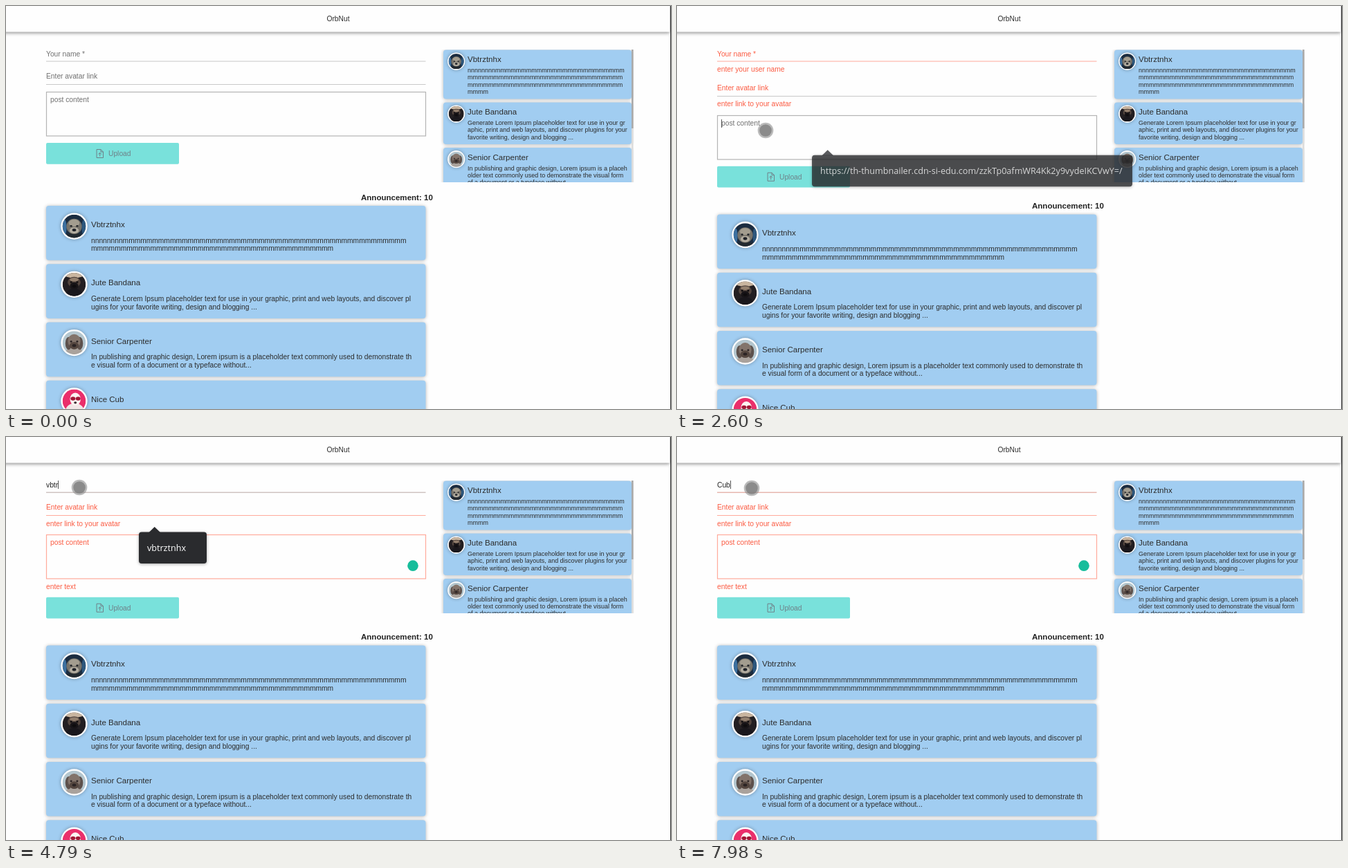
Recreate the animation shown at these times as an HTML page with a canvas. Size 961 by 583 pixels, loop 8000 ms.

```html
<!DOCTYPE html>
<html lang="en">
<head>
<meta charset="utf-8">
<title>Post board</title>
<style>
html, body { margin: 0; width: 100%; height: 100%; overflow: hidden; background: #fefefe; }
canvas { display: block; }
</style>
</head>
<body>
<canvas id="stage" width="961" height="583"></canvas>
<script>
const ctx = document.getElementById('stage').getContext('2d');
const LOOP = 8000, TICK = 1000 / 15, ERROR_HEIGHT = 16.85;
const SANS = '"Liberation Sans", Arial, sans-serif';
const POPUP_FONT = '"Open Sans", "Noto Sans", sans-serif';
const LABEL = '#707070', RED = '#fb5a41', INK = '#2c2c2c';
const LINE_GREY = [200, 200, 200], BOX_GREY = [180, 180, 180], LINE_RED = [255, 170, 155];
const USER = 'vbtrztnhx';
const LINK = 'https://th-thumbnailer.cdn-si-edu.com/zzkTp0afmWR4Kk2y9vydeIKCVwY=/';
const ms = n => 'm'.repeat(n);

const posts = [
  { name: 'Vbtrztnhx', face: shaggyDog,
    wide: ['n'.repeat(8) + ms(48), ms(41)],
    narrow: ['n'.repeat(8) + ms(25), ms(30), ms(30), ms(4)] },
  { name: 'Jute Bandana', face: pug,
    wide: ['Generate Lorem Ipsum placeholder text for use in your graphic, print and web layouts, and discover pl',
      'ugins for your favorite writing, design and blogging ...'],
    narrow: ['Generate Lorem Ipsum placeholder text for use in your gr',
      'aphic, print and web layouts, and discover plugins for your',
      'favorite writing, design and blogging ...'] },
  { name: 'Senior Carpenter', face: greyDog,
    wide: ['In publishing and graphic design, Lorem ipsum is a placeholder text commonly used to demonstrate th',
      'e visual form of a document or a typeface without...'],
    narrow: ['In publishing and graphic design, Lorem ipsum is a placeh',
      'older text commonly used to demonstrate the visual form',
      'of a document or a typeface without...'] },
  { name: 'Nice Cub', face: partyDog, wide: [], narrow: [] }
];

// [time, text in the name field]
const typing = [[0, ''], [4200, USER.slice(0, 1)], [4400, USER.slice(0, 2)], [4530, USER.slice(0, 3)],
  [4660, USER.slice(0, 4)], [5920, USER.slice(0, 3)], [6120, USER.slice(0, 2)], [6250, USER.slice(0, 1)],
  [6380, ''], [7310, 'C'], [7520, 'Cu'], [7850, 'Cub']];

// [time, x, y]
const pointerPath = [[460, 788, 541], [860, 240, 110], [1000, 148, 55], [1070, 143, 61], [1260, 143, 61],
  [1460, 112, 71], [1730, 110, 72], [2000, 123, 113], [2200, 123, 113], [2530, 128, 179], [2600, 128, 180],
  [2870, 118, 28], [3130, 103, 79], [3470, 103, 79], [3930, 106, 73], [5260, 106, 73], [5395, 97, 75],
  [5520, 106, 75], [6120, 106, 75], [6510, 109, 75], [7060, 109, 75], [7120, 108, 74]];
const presses = [[1460, 1590], [2060, 2130], [2470, 2590], [3080, 3270]];

const between = (t, a, b) => t >= a && t < b;
const ramp = (t, start, span = 300) => Math.min(1, Math.max(0, (t - start) / span));
const mix = (a, b, k) => `rgb(${a.map((v, i) => Math.round(v + (b[i] - v) * k))})`;

function text(str, x, y, size = 10.25, color = INK, { weight = '', family = SANS, align = 'left' } = {}) {
  ctx.font = `${weight} ${size}px ${family}`;
  ctx.fillStyle = color;
  ctx.textAlign = align;
  ctx.fillText(str, x, y);
}

function rect(x, y, w, h, color) {
  ctx.fillStyle = color;
  ctx.fillRect(x, y, w, h);
}

function roundRect(x, y, w, h, r, color) {
  ctx.fillStyle = color;
  ctx.beginPath();
  ctx.roundRect(x, y, w, h, r);
  ctx.fill();
}

function oval(x, y, rx, ry, color) {
  ctx.fillStyle = color;
  ctx.beginPath();
  ctx.ellipse(x, y, rx, ry, 0, 0, 7);
  ctx.fill();
}

function withShadow(blur, alpha, offset, draw) {
  ctx.save();
  ctx.shadowColor = `rgba(0,0,0,${alpha})`;
  ctx.shadowBlur = blur;
  ctx.shadowOffsetY = offset;
  draw();
  ctx.restore();
}

// Portraits are painted in a unit circle.
function eyesAndNose(color, y) {
  oval(-0.26, y, 0.09, 0.08, color);
  oval(0.26, y, 0.09, 0.08, color);
  oval(0, y + 0.34, 0.17, 0.12, color);
}
function shaggyDog() {
  rect(-1, -1, 2, 2, '#1b2c40');
  oval(-0.85, 0.1, 0.2, 0.7, '#3d709f');
  oval(0.85, 0.1, 0.2, 0.7, '#2d577d');
  oval(0, 0.95, 0.7, 0.4, '#22292f');
  oval(0, 0.02, 0.66, 0.66, '#77736a');
  oval(0, -0.28, 0.46, 0.3, '#a39d8f');
  oval(0, 0.36, 0.4, 0.26, '#b3ada0');
  eyesAndNose('#1d2026', -0.02);
}
function pug() {
  rect(-1, -1, 2, 2, '#231f22');
  oval(0, -0.9, 0.9, 0.34, '#c9b59f');
  oval(0, -0.2, 0.56, 0.46, '#54463f');
  oval(0, -0.42, 0.38, 0.16, '#94806e');
  oval(0, 0.12, 0.36, 0.3, '#171417');
  oval(0, 0.85, 0.7, 0.5, '#19171c');
  eyesAndNose('#0e0c0e', -0.2);
}
function greyDog() {
  rect(-1, -1, 2, 2, '#b4c6ce');
  oval(0, 0.9, 0.75, 0.5, '#aaa29c');
  oval(-0.48, 0.05, 0.28, 0.55, '#5d514c');
  oval(0.48, 0.05, 0.28, 0.55, '#5d514c');
  oval(0, -0.14, 0.54, 0.6, '#83746b');
  oval(0, 0.25, 0.4, 0.32, '#54463f');
  eyesAndNose('#2a2324', -0.1);
}
function partyDog() {
  rect(-1, -1, 2, 2, '#ea2f6b');
  oval(0.05, 0.85, 0.8, 0.65, '#f1e6e6');
  oval(0.1, -0.15, 0.46, 0.55, '#fbf3f1');
  oval(-0.1, -0.2, 0.21, 0.16, '#a31836');
  oval(0.34, -0.2, 0.21, 0.16, '#a31836');
  oval(0.1, 0.15, 0.12, 0.09, '#3b2a30');
}

function avatar(x, y, r, border, face) {
  withShadow(5, 0.3, 0, () => oval(x, y, r, r, '#fff'));
  ctx.save();
  ctx.beginPath();
  ctx.arc(x, y, r - border, 0, 7);
  ctx.clip();
  ctx.translate(x, y);
  ctx.scale(r - border, r - border);
  face();
  ctx.restore();
}

function card(x, y, w, h) {
  withShadow(5, 0.3, 0.5, () => roundRect(x, y, w, h, 4, '#a1cdf1'));
}

function header() {
  withShadow(5, 0.45, 1, () => rect(-10, -10, 969, 47.5, '#fefefe'));
  text('OrbNut', 480, 22, 10.25, INK, { align: 'center' });
  rect(960, 0, 1, 583, '#2a2a2a');
}

function sidebar() {
  ctx.save();
  ctx.beginPath();
  ctx.rect(628, 63, 280, 192);
  ctx.clip();
  let top = 63.5;
  for (const post of posts.slice(0, 3)) {
    const height = 29.2 + post.narrow.length * 10.45;
    card(632, top, 272, height);
    avatar(650.7, top + 16.6, 12.6, 1.6, post.face);
    text(post.name, 667, top + 17.7, 11.54);
    post.narrow.forEach((line, i) => text(line, 667, top + 32.5 + i * 10.45, 8.97));
    top += height + 5;
  }
  rect(904, 63, 2.5, 192, '#dcdcdc');
  rect(904, 63, 2.5, 114, '#a9a9a9');
  ctx.restore();
}

function postList(shift) {
  text('Announcement: 10', 513, 281 + shift, 11.54, '#222', { weight: 'bold' });
  posts.forEach((post, i) => {
    const top = 289 + shift + i * 84.25;
    card(58, top, 548.5, 78.7);
    avatar(98.5, top + 29.6, 19.2, 2.4, post.face);
    text(post.name, 123, top + 31, 11.54);
    post.wide.forEach((line, n) => text(line, 123, top + 53.7 + n * 11.6));
  });
}

function uploadButton(top) {
  roundRect(58, top, 192, 30.7, 2, '#79e1db');
  text('Upload', 148, top + 18.8, 10.25, '#6f8088');
  ctx.strokeStyle = '#6f8088';
  ctx.lineWidth = 1;
  ctx.beginPath();
  ctx.moveTo(137, top + 9.5);
  ctx.lineTo(131, top + 9.5);
  ctx.lineTo(131, top + 21.5);
  ctx.lineTo(140.5, top + 21.5);
  ctx.lineTo(140.5, top + 13);
  ctx.lineTo(137, top + 9.5);
  ctx.lineTo(137, top + 13);
  ctx.lineTo(140.5, top + 13);
  ctx.moveTo(135.7, top + 19.5);
  ctx.lineTo(135.7, top + 14.5);
  ctx.moveTo(133.5, top + 16.5);
  ctx.lineTo(135.7, top + 14.2);
  ctx.lineTo(138, top + 16.5);
  ctx.stroke();
}

function caret(x, y) {
  rect(Math.round(x), Math.round(y), 1, 12, '#555');
}

function form(t) {
  const name = typing.findLast(([start]) => t >= start)[1];
  const nameError = t >= 2060 && name.length < 3;
  const linkError = t >= 2600;
  const postError = t >= 3200;
  const nameFocus = t >= 3080;
  const linkTop = nameError ? ERROR_HEIGHT : 0;
  const postTop = 124 + linkTop + (linkError ? ERROR_HEIGHT : 0);
  const errors = nameError + linkError + postError;

  const nameRed = ramp(t, 2060) - ramp(t, 4530) + ramp(t, 6120) - ramp(t, 7850);
  if (name) text(name, 58, 72.6, 10.25, '#222');
  else text('Your name *', 58, 72.6, 10.25, nameError ? RED : LABEL);
  if (nameFocus && t >= 3400 && !between(t, 6850, 7310)) {
    ctx.font = `10.25px ${SANS}`;
    caret(58 + ctx.measureText(name).width, 63);
  }
  rect(58, 79.5, 548.5, nameFocus ? 1.5 : 1, mix(LINE_GREY, LINE_RED, nameRed));
  if (nameError) text(name ? 'name is too short' : 'enter your user name', 58, 95.2, 10.25, RED);

  text('Enter avatar link', 58, 104.8 + linkTop, 10.25, linkError ? RED : LABEL);
  if (between(t, 2130, 2530)) caret(58, 95 + linkTop);
  rect(58, Math.round(113 + linkTop), 548.5, 1, mix(LINE_GREY, LINE_RED, ramp(t, 2600)));
  if (linkError) text('enter link to your avatar', 58, 128.6 + linkTop, 10.25, RED);

  ctx.strokeStyle = mix(BOX_GREY, LINE_RED, ramp(t, 3140));
  ctx.lineWidth = 1.2;
  ctx.strokeRect(58.5, Math.round(postTop) + 0.5, 548, 63.5);
  text('post content', 64, postTop + 15.2, 10.25, postError ? RED : LABEL);
  if (between(t, 2590, 3080)) caret(64, postTop + 6);
  if (postError) text('enter text', 58, postTop + 79, 10.25, RED);
  if (t >= 3600) oval(588, postTop + 45.3, 7.8, 7.8, '#17bd9b');

  uploadButton(198 + errors * ERROR_HEIGHT);
  postList(Math.max(0, errors * ERROR_HEIGHT - 21.3));
}

// While opening, a popup is slightly smaller and casts no shadow yet.
function popup(x, y, w, str, alpha, open = 1) {
  if (alpha <= 0) return;
  ctx.save();
  ctx.globalAlpha = alpha;
  const size = open - 1;
  withShadow(4, 0.35 * open, 1, () => roundRect(x, y + 7.5, w + size, 45.5 + size, 4, '#2a2b2e'));
  ctx.fillStyle = '#2a2b2e';
  ctx.beginPath();
  ctx.moveTo(x + 14.5, y + 8);
  ctx.lineTo(x + 22.7, y);
  ctx.lineTo(x + 31, y + 8);
  ctx.fill();
  text(str, x + 12, y + 35, 12.6, '#fff', { family: POPUP_FONT });
  ctx.restore();
}

function pointer(t) {
  if (t < 460) return;
  const tick = Math.floor((t + 14) / TICK) * TICK;
  const next = pointerPath.findIndex(([time]) => time > tick);
  let [, x, y] = pointerPath.at(next < 0 ? -1 : Math.max(0, next - 1));
  if (next > 0) {
    const [t0] = pointerPath[next - 1], [t1, x1, y1] = pointerPath[next];
    const k = ramp(tick, t0, t1 - t0), ease = k * k * (3 - 2 * k);
    x += (x1 - x) * ease;
    y += (y1 - y) * ease;
  }
  const pressed = presses.some(([a, b]) => between(t, a, b));
  oval(x, y, 11.3, 11.3, pressed ? 'rgba(226,216,70,.75)' : 'rgba(140,140,140,.6)');
  oval(x, y, 8.8, 8.8, pressed ? 'rgba(176,166,20,.75)' : 'rgba(120,120,120,.72)');
}

function draw(t) {
  rect(0, 0, 961, 583, '#fefefe');
  header();
  sidebar();
  form(t);
  if (t < 2060) popup(192, 130, 98, USER, ramp(t, 1500, 90));
  else popup(192, 130, 98, USER, ramp(t, 4180, 60) - ramp(t, 6380, 130), ramp(t, 4300, 130));
  popup(195, 208.2, 463, LINK, ramp(t, 2180, 130) - ramp(t, 2560, 180));
  pointer(t);
}

const begin = performance.now();
function frame() {
  draw((performance.now() - begin) % LOOP);
  requestAnimationFrame(frame);
}
frame();
</script>
</body>
</html>
```
